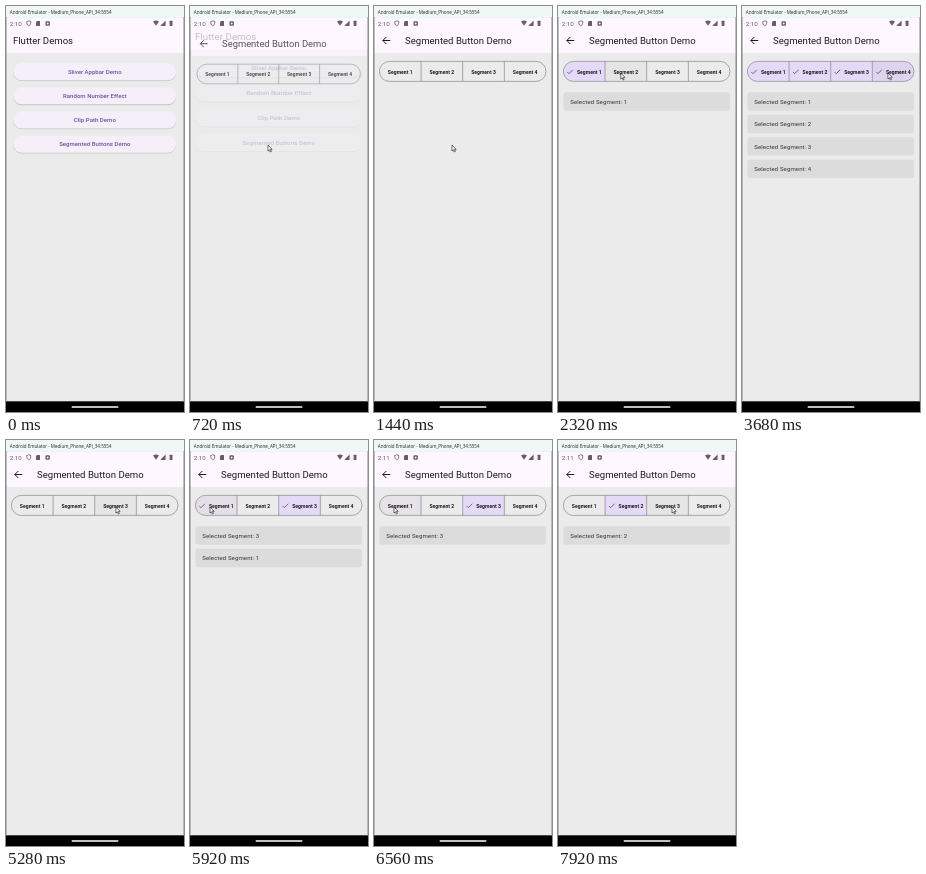
An HTML page for the animation above (8 s loop, 178 px wide and 406 px high).

```html
<!DOCTYPE html>
<html lang="en">
<head>
<meta charset="utf-8">
<title>Segmented Button Demo</title>
<style>
html, body { margin: 0; width: 100%; height: 100%; overflow: hidden; background: #ebebeb; }
svg { display: block; width: 100%; height: 100%; }
text { font-family: Roboto, sans-serif; }
.bar { font-family: "Open Sans", "Noto Sans", sans-serif; }
</style>
</head>
<body>
<svg id="stage" viewBox="0 0 178 406"></svg>
<script>
const LOOP = 8000, STEP = 80;
const SEG = { x: 5.4, y: 55.4, w: 41.65, h: 20 }, CURSOR_Y = 67;
const INK = '#1d1b20', OUTLINE = '#79747e';
const stage = document.getElementById('stage');
const clamp = v => Math.max(0, Math.min(1, v));
const easeOut = k => 1 - (1 - k) ** 3;
const segAt = x => Math.floor((x - SEG.x) / SEG.w) + 1;

// Each click on the segments: time, cursor x. The x decides which segment toggles.
const clicks = [
  [2080, 30], [2480, 64], [2880, 110], [3200, 146], [3840, 146], [4160, 108], [4480, 70],
  [5040, 30], [5360, 113], [5920, 20], [6480, 20], [7040, 62], [7760, 114]
];
// The cursor rests at each stop until its time, then glides to the next one.
const stops = [[80, 33, 8], [1360, 78, 139], ...clicks];

function cursorAt(t) {
  const next = stops.findIndex(s => s[0] > t);
  if (next === 0) return null;
  const i = next < 0 ? stops.length - 1 : next;
  const [t0, x0, y0 = CURSOR_Y] = stops[i - 1], [, x1, y1 = CURSOR_Y] = stops[i];
  const k = next < 0 ? 1 : easeOut(clamp((t - t0 - STEP) / 240));
  return { x: x0 + (x1 - x0) * k, y: y0 + (y1 - y0) * k };
}

const text = (s, x, cy, size, fill, extra = '') =>
  `<text x="${x}" y="${cy + size * .355}" font-size="${size}" fill="${fill}" ${extra}>${s}</text>`;
const rect = (x, y, w, h, fill, r = 0, extra = '') =>
  `<rect x="${x}" y="${y}" width="${w}" height="${h}" rx="${r}" fill="${fill}" ${extra}/>`;
const line = (d, stroke, w) =>
  `<path d="${d}" fill="none" stroke="${stroke}" stroke-width="${w}"/>`;
const shape = (d, fill) => `<path d="${d}" fill="${fill}"/>`;
const mid = 'text-anchor="middle"';

const page = (title, x) => rect(0, 11.5, 178, 385, '#ebebeb') +
  rect(0, 11.5, 178, 35.5, '#fef7ff') + text(title, x, 34.4, 9.58, INK);

function home() {
  const labels = ['Sliver Appbar Demo', 'Random Number Effect', 'Clip Path Demo', 'Segmented Buttons Demo'];
  return page('Flutter Demos', 7) + labels.map((s, i) => {
    const y = 57 + i * 24.15;
    return rect(7.2, y + .8, 163, 17.2, '#000', 8.6, 'opacity=".17"') +
      rect(7.2, y, 163, 17.2, '#f5effa', 8.6) +
      text(s, 88.8, y + 8.7, 6.05, '#6750a4', mid + ' font-weight="500" letter-spacing=".02"');
  }).join('');
}

function demo(t, cursor) {
  const chosen = new Set(), changed = {};
  for (const [at, x] of clicks) if (at <= t) {
    const n = segAt(x);
    chosen.delete(n) || chosen.add(n);
    changed[n] = at;
  }
  const pill = (fill, extra) => rect(SEG.x, SEG.y, SEG.w * 4, SEG.h, fill, 10, extra);
  let fills = '', labels = '', edges = '';
  for (let n = 1; n <= 4; n++) {
    const x = SEG.x + (n - 1) * SEG.w, c = x + SEG.w / 2, on = chosen.has(n);
    const k = clamp((t - (changed[n] ?? -LOOP) + STEP) / 200);
    const cell = (fill, opacity) => rect(x, SEG.y, SEG.w, SEG.h, fill, 0, `opacity="${opacity}"`);
    fills += cell('#e4d9f6', on ? k : 1 - k);
    if (cursor && cursor.y < SEG.y + SEG.h && segAt(cursor.x) === n) fills += cell(INK, .025);
    labels += text('Segment ' + n, c + (on ? 5.1 : 0), 65.8, 5.05, INK,
      mid + ' font-weight="700" letter-spacing=".03"');
    if (on) labels += line(`M${c - 17} 65.9l1.8 1.8l3.8 -3.9`, '#4a4458', .75);
    if (n > 1) edges += `M${x} ${SEG.y}v${SEG.h}`;
  }
  const rows = [...chosen].map((n, i) => {
    const y = 86.3 + i * 22.45;
    return rect(5.4, y, 166.6, 18.4, '#dcdcdc', 2.6) +
      text('Selected Segment: ' + n, 12.3, y + 9.4, 6.05, '#333', 'letter-spacing=".1"');
  });
  return page('Segmented Button Demo', 31) +
    line('M16.3 34.5H8.8M12.3 31L8.8 34.5L12.3 38', INK, 1) +
    `<clipPath id="pill">${pill('#000')}</clipPath><g clip-path="url(#pill)">${fills}</g>` +
    line(edges, OUTLINE, .6) + pill('none', `stroke="${OUTLINE}" stroke-width=".6"`) +
    labels + rows.join('');
}

function bars(t) {
  const grey = '#655f68';
  return rect(0, 0, 178, 11.5, '#f0f7f7') +
    text('Android Emulator - Medium_Phone_API_34:5554', 3.8, 6.2, 4.53, '#222', 'class="bar"') +
    text(t < 6240 ? '2:10' : '2:11', 3.8, 17.5, 6.2, grey) +
    line('M20.6 15.6L22.8 14.8L25 15.6Q25 19 22.8 20Q20.6 19 20.6 15.6Z', grey, .8) +
    shape('M31 15H34V20H30V16Z', grey) +
    rect(39.5, 15.2, 4.4, 4.6, grey, 1) + rect(40.8, 16.6, 1.8, 1.8, '#fef7ff', .9) +
    shape('M147 15.6Q150 13.2 153 15.6L150 19.8Z M159.6 14.6V20H154.2Z', grey) +
    rect(163.6, 14.8, 2.9, 5.2, grey, .4) +
    rect(0, 395.3, 178, 10.7, '#000') + rect(65.5, 400.2, 47, 1.6, '#fff', .8) +
    line('M.3 11V396M177.7 11V396', '#7d8582', .6);
}

function draw(t) {
  const cursor = cursorAt(t), k = clamp((t - 560) / 320);
  const zoom = (s, opacity, body) =>
    `<g opacity="${opacity}" transform="translate(89 204) scale(${s}) translate(-89 -204)">${body}</g>`;
  let out = `<clipPath id="screen">${rect(0, 11.5, 178, 385, '#000')}</clipPath><g clip-path="url(#screen)">`;
  if (k < 1) out += zoom(1 + .05 * k, 1, home());
  if (k > 0) out += zoom(.85 + .15 * easeOut(k), clamp(k * 1.5), demo(t, cursor));
  out += '</g>' + bars(t);
  if (cursor)
    out += `<path transform="translate(${cursor.x} ${cursor.y})" d="M0 0V6L1.4 4.8L2.4 7L3.4 6.5L2.4 4.4H4.2Z" fill="#fff" stroke="#111" stroke-width=".6"/>`;
  stage.innerHTML = out;
}

const start = performance.now();
let shown = -1;
function tick() {
  const t = Math.floor((performance.now() - start) % LOOP / STEP) * STEP;
  if (t !== shown) draw(shown = t);
  requestAnimationFrame(tick);
}
tick();
</script>
</body>
</html>
```
